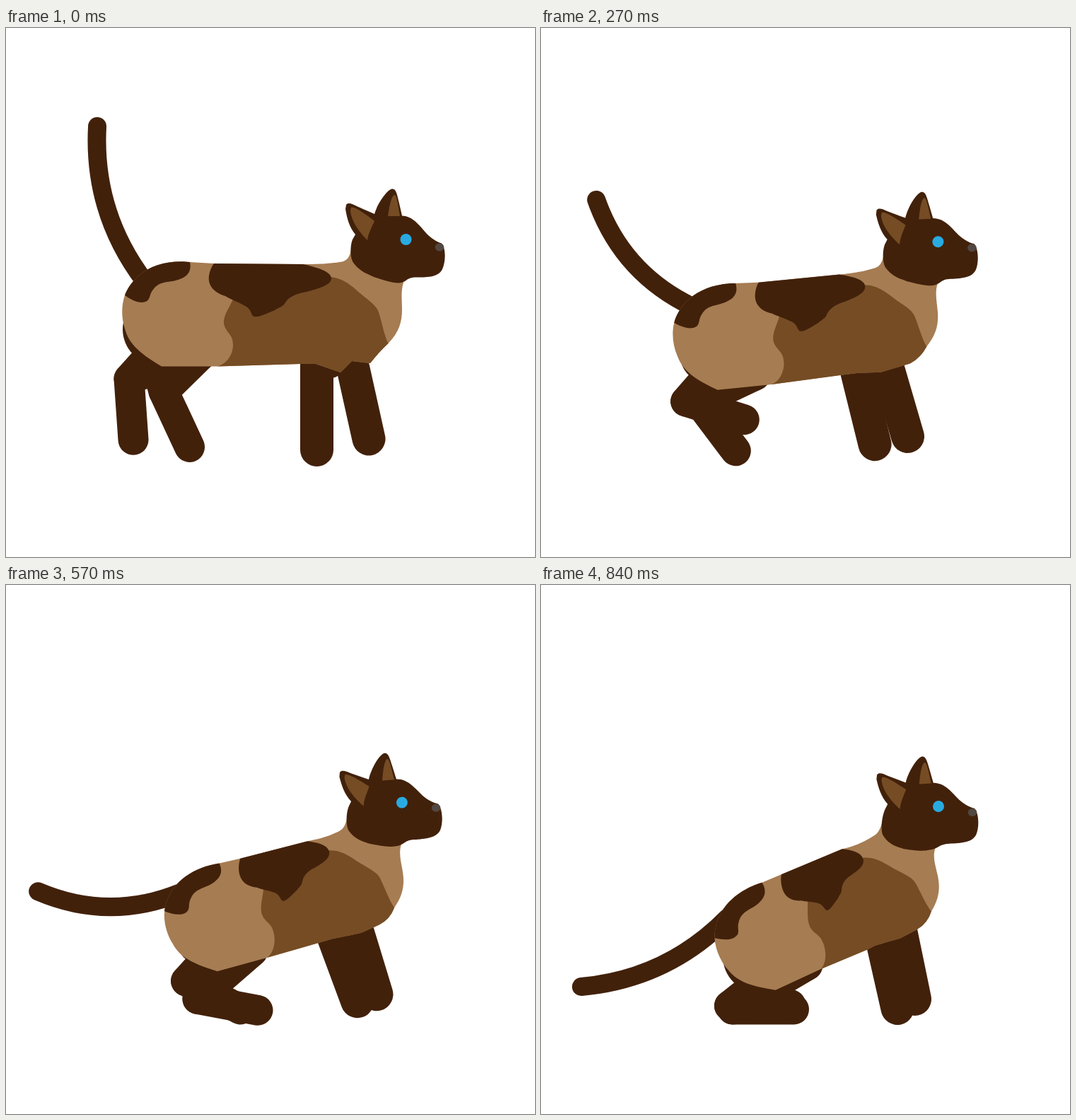
Recreate the animation shown at these times as an HTML page. Size 748x748 px, loop 1.08 s.

```html
<!DOCTYPE html>
<html lang="en">
<head>
<meta charset="utf-8">
<title>Cat sitting down</title>
<style>
  html, body { margin: 0; width: 100%; height: 100%; overflow: hidden; background: #fff; }
  svg { display: block; width: 100vw; height: 100vh; }
</style>
</head>
<body>
<svg id="stage" viewBox="0 0 748 748"></svg>
<script>
const DARK = '#42210b', BROWN = '#754c24', TAN = '#a67c52', BLUE = '#29abe2', GREY = '#534741';
const LOOP = 1080, STEP = 30, LAST = 27, SHIN = 86.5;

const svg = document.getElementById('stage');
function add(tag, attrs, parent = svg) {
  const el = document.createElementNS('http://www.w3.org/2000/svg', tag);
  for (const name in attrs) el.setAttribute(name, attrs[name]);
  return parent.appendChild(el);
}
const fill = color => add('path', { fill: color });
const limb = (width, inside = 'none') => add('path', {
  fill: inside, stroke: DARK, 'stroke-width': width, 'stroke-linecap': 'round', 'stroke-linejoin': 'round' });

// Back to front.
const tail = limb(26);
const rump = add('circle', { fill: DARK });
const thighA = limb(43, DARK), shinA = limb(43), thighB = limb(43, DARK), shinB = limb(43);
const joint = add('circle', { r: 15, fill: DARK });
const far = limb(47), near = limb(47);
const body = fill(TAN), side = fill(BROWN), saddle = fill(DARK), hipPatch = fill(DARK);
const skull = fill(DARK);
const face = add('g', {});
add('path', { fill: BROWN, d:
  'M488,254C492,251 512,266 521,273C517,282 512,291 511,300C503,292 488,275 487,258Z' +
  'M540,266C542,252 545,238 549,236C553,236 554,250 557,266Z' }, face);
add('circle', { cx: 565.5, cy: 299, r: 8, fill: BLUE }, face);
add('ellipse', { cx: 613, cy: 310, rx: 6.3, ry: 5.6, fill: GREY }, face);

// Outlines in the standing pose.
const RUMP_EDGE = 'M260,331C232,328 205,335 188,350C176,360 170,372 168,378';
const HIP_PATCH = RUMP_EDGE + 'C175,383 184,388 192,388C206,387 201,378 208,370' +
  'C218,356 232,361 246,355C260,350 262,340 260,331Z';
const SADDLE = 'M294,333L420,334C438,338 460,344 460,354C460,364 440,369 425,373' +
  'C412,375 400,380 395,388C392,394 388,394 380,399C370,403 356,410 351,408' +
  'C346,407 348,398 338,393C328,387 318,384 310,379C294,374 285,364 287,350C288,343 291,337 294,333Z';
const SKULL = 'M481,250C484,246 490,249 496,252L521,263C526,246 540,228 546,227.5' +
  'C552,227 553,236 556,248L560,265.5C576,266 586,281 595,291C601,297 608,302 616,304.5' +
  'C622,311 622,330 617,341C611,353 595,352.5 578,352.5C566,353 566,360 556,360.5' +
  'C545,361 530,355 520,352C506,346 497,341 490,330C486,322 487,306 490,299L494,292' +
  'C485,281 482,268 480,256Z';

const clamp = x => Math.min(1, Math.max(0, x));
const smooth = x => x * x * (3 - 2 * x);
const rad = deg => deg * Math.PI / 180;
const mix = (p, q, w) => [p[0] + (q[0] - p[0]) * w, p[1] + (q[1] - p[1]) * w];
const chain = pts => pts.map(p => 'L' + p.join(',')).join('');
const line = (el, ...pts) => el.setAttribute('d', 'M' + pts.map(p => p.join(',')).join('L'));
const place = (el, [x, y]) => { el.setAttribute('cx', x); el.setAttribute('cy', y); };

// Carries rest points along with a part that moves from one spot to another and turns.
function rigid([x0, y0], [x1, y1], deg) {
  const c = Math.cos(rad(deg)), s = Math.sin(rad(deg));
  return (x, y) => [x1 + (x - x0) * c + (y - y0) * s, y1 - (x - x0) * s + (y - y0) * c];
}

function draw(k) {
  const p = k / LAST;
  const arc = Math.sin(Math.PI * p), wave = Math.sin(2 * Math.PI * p);
  const go = (a, b, power = 1) => a + (b - a) * p ** power;

  const toRear = rigid([260, 331],
    [260 + 53 * smooth(p ** 0.85), go(331, 421, 0.9)], go(0, 22.2, 1.15));
  const toChest = rigid([561, 361], [go(561, 554), go(361, 374, 1.2)], go(0, 12.2, 0.8));
  const eye = [go(565.5, 562) - 3.8 * arc, go(299, 313, 1.2)], nod = go(0, 3) + 2.6 * arc;
  const toHead = rigid([565.5, 299], eye, nod);

  // The spine bends between rear and chest, the neck between chest and head.
  const warp = (x, y) => {
    const q = mix(toRear(x, y), toChest(x, y), clamp((x - 250) / 215) ** 1.5);
    return x > 470 ? mix(q, toHead(x, y), clamp((360 - y) / 60 + Math.max(0, (x - 555) / 20))) : q;
  };
  const shape = (el, d) => el.setAttribute('d', d.replace(/([\d.]+),([\d.]+)/g,
    (_, x, y) => warp(+x, +y).map(n => n.toFixed(2)).join(',')));

  // Belly skin sags between the front legs while the cat stands.
  const sag = (1 - p) ** 5, tight = 1 - sag, drop = p * p;
  const belly = [[416, 475 + 6 * drop], [438, 475 + 3 * drop], [473, 475 + 12 * sag],
    [489, 474 - 3 * sag], [515, 467 + 7 * sag]];
  const breast = `${528 + 4 * tight},${457.5 + 4 * tight} `;

  shape(body, RUMP_EDGE + 'C163,392 163,410 168,425C173,444 185,458 220,478.5L299,478.5' + chain(belly) +
    `Q${breast}540.5,446C556,430 560,415 560,398C560,385 558,372 562,360L570,330L500,300L490,302` +
    'C488,315 487,328 475,330.5C455,334 430,334 420,334L294,333Z');
  shape(side, 'M322,381L440,350L458,352C480,354 492,368 503,377C515,387 524,393 527,402' +
    `C531,414 535,436 540.5,446Q${breast}515,${belly[4][1]}` + chain(belly.slice(0, 4).reverse()) +
    'L299,478.5C312,475 321,462 321,448C321,432 311,432 308,418C307,406 316,396 322,381Z');
  shape(saddle, SADDLE);
  shape(hipPatch, HIP_PATCH);
  shape(skull, SKULL);
  face.setAttribute('transform', `translate(${eye}) rotate(${-nod}) translate(-565.5 -299)`);

  place(rump, toRear(215, 426));
  rump.setAttribute('r', 45 + 5 * Math.cos(2 * Math.PI * p));
  place(joint, warp(460, 480));

  // The tail swings down around its root with a steady bow.
  const root = toRear(196, 358);
  const swing = rad(go(17, 115.3) - 6 * wave + 2 * arc), len = 229 - 32 * arc, bow = 28;
  const ux = Math.sin(swing), uy = Math.cos(swing);
  const tip = [root[0] - len * ux, root[1] - len * uy];
  const bend = w => mix(tip, root, w).map((v, i) => v + bow * (i ? ux : -uy)).join(',');
  tail.setAttribute('d', `M${tip}C${bend(1 / 3)} ${bend(2 / 3)} ${root}`);

  // Front legs slide forward, their feet lifting slightly.
  line(near, [go(439.5, 484, 1.5), go(470, 510, 0.75)],
    [504 - 64.5 * (1 - p) ** 2, go(596.5, 598.5) - 10.5 * arc]);
  line(far, [go(491, 509, 3), go(482, 491)],
    [go(513, 528.5, 0.85), go(581, 585.5) - 6 * arc]);

  // Hind legs: a thigh triangle from the rear to the knee, then the shin.
  const hind = (thigh, shin, knee, deg) => {
    const a = rad(deg);
    line(thigh, toRear(208, 458), knee, toRear(275, 463));
    line(shin, knee, [knee[0] + SHIN * Math.cos(a), knee[1] + SHIN * Math.sin(a)]);
  };
  const fold = smooth(clamp((k - 2) / 16));
  hind(thighA, shinA, [174 + 97 * fold, go(496, 540) + 60 * fold],
    73 * clamp(1 - k / 8.5) + 13 * clamp((LAST - k) / 11));
  hind(thighB, shinB, [go(223, 266.5, 1.4) - 8 * wave, go(514, 595, 1.4)], go(65, -1, 1.4));
}

const start = performance.now();
let shown = -1;
function tick() {
  const t = (performance.now() - start) % LOOP;
  const k = Math.min(LAST, Math.max(0, Math.floor(t / STEP) - 1));
  if (k !== shown) draw(shown = k);
  requestAnimationFrame(tick);
}
tick();
</script>
</body>
</html>
```
